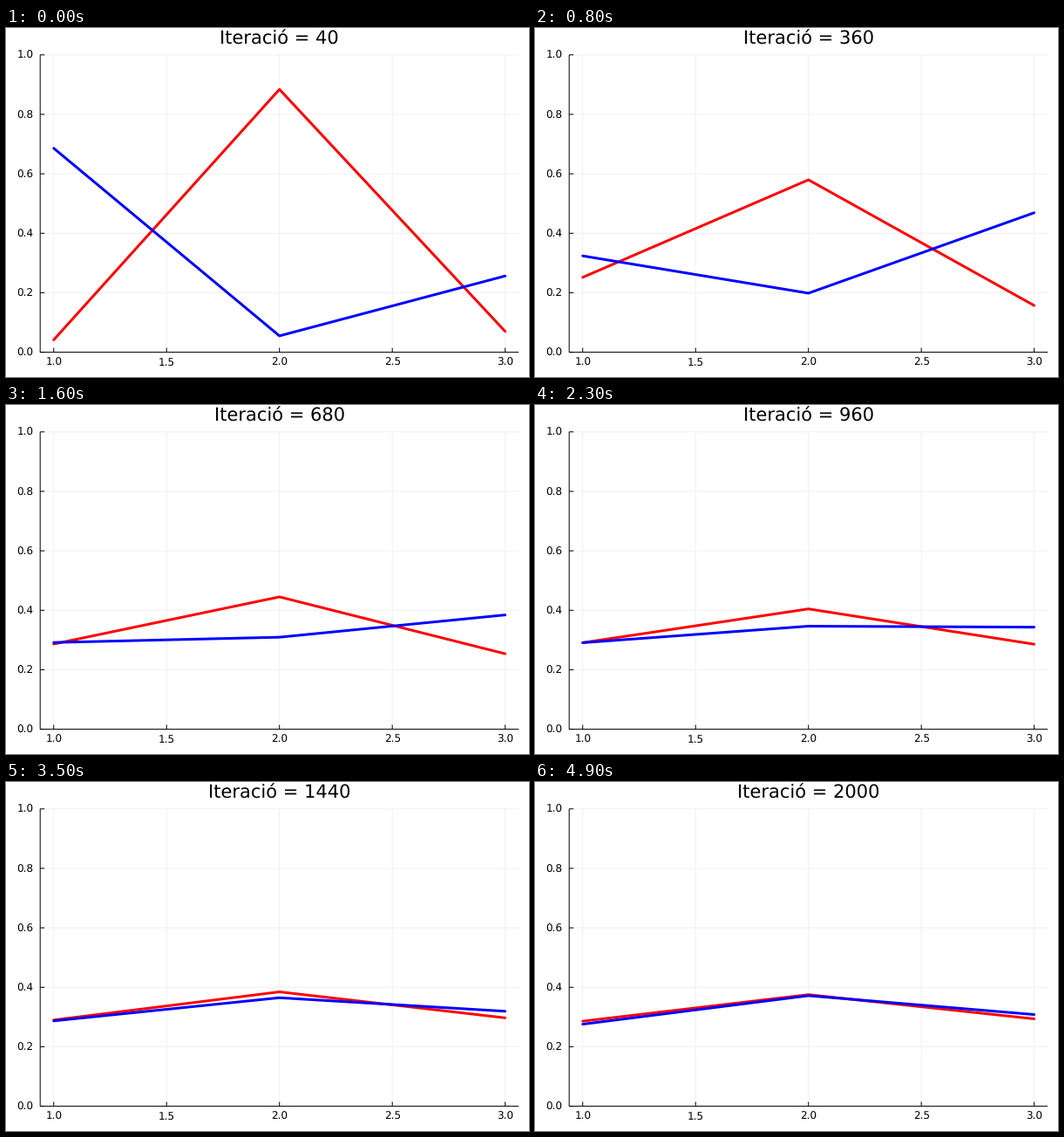
These frames come from a looping animation (600 px wide and 400 px high, 5000 ms). A matplotlib script:

```python
import matplotlib.pyplot as plt
import numpy as np
from matplotlib.animation import FuncAnimation

W, H, DPI = 600, 400, 100
FRAMES, INTERVAL, STEP = 50, 100, 40
PX = 72 / DPI  # points per pixel
LEFT, RIGHT, TOP, BOTTOM = 39.2, 588.2, 30.8, 371.6
TAU = 500  # relaxation time in ms

plt.rcParams["font.family"] = "DejaVu Sans"
plt.rcParams["text.hinting"] = "none"
fig = plt.figure(figsize=(W / DPI, H / DPI), dpi=DPI, facecolor="white")
ax = fig.add_axes([0, 0, 1, 1])
ax.set(xlim=(0, W), ylim=(H, 0))
ax.axis("off")


def to_x(state):
    return LEFT + (np.asarray(state) - 0.94) / 2.12 * (RIGHT - LEFT)


def to_y(prob):
    return BOTTOM - np.asarray(prob) * (BOTTOM - TOP)


def stroke(xs, ys, color, width=1, **kw):
    return ax.plot(xs, ys, color=color, lw=width * PX, snap=False, **kw)[0]


def label(x, y, text, size, align="center"):
    return ax.text(x, y, text, size=size * PX, ha=align, va="baseline")


def draw_axes():
    axis = dict(color="black", zorder=3, solid_capstyle="butt")
    for value in np.arange(1, 3.1, 0.5):
        x = to_x(value)
        stroke([x, x], [TOP, BOTTOM], "#f0f0f0")
        stroke([x, x], [BOTTOM - 5, BOTTOM], **axis)
        label(x, 386.7, f"{value:.1f}", 12)
    for value in np.arange(0, 1.1, 0.2):
        y = to_y(value)
        stroke([LEFT, RIGHT], [y, y], "#f0f0f0")
        stroke([LEFT, LEFT + 5], [y, y], **axis)
        label(31.3, y + 4.4, f"{value:.1f}", 12, "right")
    stroke([LEFT, LEFT], [TOP, BOTTOM], **axis)
    stroke([LEFT, RIGHT], [BOTTOM, BOTTOM], **axis)


class Walker:
    """Distribution over three states that relaxes, critically damped,
    onto an equilibrium which itself drifts slowly."""

    def __init__(self, color, start, push, limit, final):
        self.start, self.push, self.limit, self.final = map(
            np.array, (start, push, limit, final))
        self.line = stroke(to_x([1, 2, 3]), to_y(start), color, 3, zorder=4,
                           solid_capstyle="round", solid_joinstyle="round")

    def move(self, frame):
        s = frame * INTERVAL / TAU
        drift = (frame / (FRAMES - 1)) ** 2
        transient = (self.start - self.limit + self.push * s) * np.exp(-s)
        state = self.limit + (self.final - self.limit) * drift + transient
        self.line.set_ydata(to_y(state))


draw_axes()
walkers = [
    Walker("#ff0000", start=(0.0415, 0.884, 0.07), push=(0.028, 0.28, -0.31),
           limit=(0.294, 0.390, 0.305), final=(0.286, 0.375, 0.294)),
    Walker("#0000ff", start=(0.686, 0.055, 0.2565), push=(-0.165, -0.315, 0.49),
           limit=(0.300, 0.362, 0.325), final=(0.276, 0.372, 0.308)),
]
title = label(to_x(2), 18.6, "", 21)


def update(frame):
    for walker in walkers:
        walker.move(frame)
    title.set_text(f"Iteració = {STEP * (frame + 1)}")
    return [title, *(walker.line for walker in walkers)]


anim = FuncAnimation(fig, update, frames=FRAMES, interval=INTERVAL, repeat=True)
plt.show()
```
